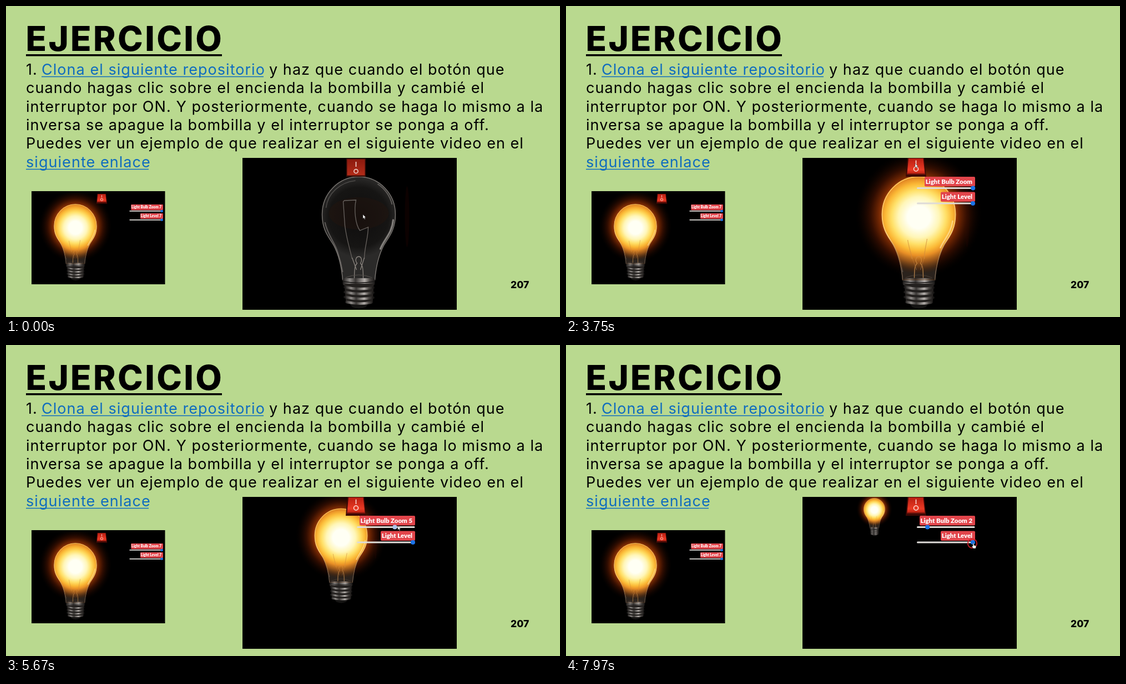
Animation of 998 by 561 pixels, one loop 8 s. Source, as an HTML page:

```html
<!DOCTYPE html>
<html lang="es">
<head>
<meta charset="utf-8">
<title>Ejercicio</title>
<style>
html, body { margin: 0; width: 100%; height: 100%; overflow: hidden; background: #b9d98f; }
svg { display: block; width: 998px; height: 561px; }
.title { font: 800 61.5px Inter, sans-serif; letter-spacing: 3.4px; }
.body { font: 400 27px Inter, sans-serif; letter-spacing: 1.05px; }
.link { fill: #0f6cbf; }
.page { font: 800 17.5px Inter, sans-serif; }
.tag { font: 900 11.4px Lato, sans-serif; fill: #fff; text-anchor: end; }
</style>
</head>
<body>
<svg viewBox="0 0 998 561">
  <defs>
    <clipPath id="bigClip"><rect x="426" y="274" width="386" height="274"/></clipPath>
    <clipPath id="smallClip"><rect x="46" y="334" width="240.5" height="168"/></clipPath>
    <radialGradient id="glow" gradientUnits="userSpaceOnUse" cx="0" cy="0" r="114">
      <stop offset=".52" stop-color="#c8560a"/>
      <stop offset=".62" stop-color="#7a2a03"/>
      <stop offset=".76" stop-color="#380f01" stop-opacity=".9"/>
      <stop offset="1" stop-color="#0a0200" stop-opacity="0"/>
    </radialGradient>
    <radialGradient id="light" gradientUnits="userSpaceOnUse" cx="0" cy="5" r="102">
      <stop offset=".2" stop-color="#fffff4"/>
      <stop offset=".36" stop-color="#fff6b8"/>
      <stop offset=".48" stop-color="#ffe068"/>
      <stop offset=".59" stop-color="#fbb936"/>
      <stop offset=".68" stop-color="#e88f26"/>
      <stop offset=".8" stop-color="#a85c18" stop-opacity=".85"/>
      <stop offset=".92" stop-color="#542808" stop-opacity=".6"/>
      <stop offset="1" stop-color="#2a1200" stop-opacity=".3"/>
    </radialGradient>
    <linearGradient id="rim" gradientUnits="userSpaceOnUse" x1="0" y1="-68" x2="0" y2="100">
      <stop offset="0" stop-color="#ffbe50"/>
      <stop offset=".65" stop-color="#ffcf78"/>
      <stop offset="1" stop-color="#8a4a12" stop-opacity=".2"/>
    </linearGradient>
    <radialGradient id="glass" gradientUnits="userSpaceOnUse" cx="0" cy="5" r="72">
      <stop offset="0" stop-color="#0e0d0d"/>
      <stop offset=".75" stop-color="#161514"/>
      <stop offset="1" stop-color="#2b2a29"/>
    </radialGradient>
    <linearGradient id="metal">
      <stop offset="0" stop-color="#1c1a19"/>
      <stop offset=".22" stop-color="#8f8b88"/>
      <stop offset=".4" stop-color="#3a3735"/>
      <stop offset=".68" stop-color="#b4afab"/>
      <stop offset=".84" stop-color="#4c4845"/>
      <stop offset="1" stop-color="#181615"/>
    </linearGradient>
    <linearGradient id="keyOff" x2="0" y2="1">
      <stop offset="0" stop-color="#8c1a0e"/><stop offset="1" stop-color="#b22c19"/>
    </linearGradient>
    <linearGradient id="keyOn" x2="0" y2="1">
      <stop offset="0" stop-color="#b81e12"/><stop offset=".75" stop-color="#ea3a24"/><stop offset="1" stop-color="#c02414"/>
    </linearGradient>
    <path id="shape" d="M-29 118C-31 95-36 73-45 56C-52 43-66 30-66 0A66 68 0 0 1 66 0C66 30 52 43 45 56C36 73 31 95 29 118Z"/>

    <g id="dark" fill="none">
      <use href="#shape" fill="url(#glass)" stroke="#77736f" stroke-width="1.5"/>
      <ellipse cx="0" cy="-2" rx="54" ry="29" fill="#24160f" opacity=".45"/>
      <path d="M-59-12C-56-38-34-58-6-61" stroke="#4c4a48" stroke-width="1.5"/>
      <path d="M62 10C60 34 46 44 39 62" stroke="#b5b1ad" stroke-width="3.2" opacity=".65" stroke-linecap="round"/>
      <path d="M-61 14C-56 38-44 48-38 68C-34 80-31 92-29 104" stroke="#85817d" stroke-width="2" opacity=".6"/>
      <path d="M34-55C46-47 56-34 60-18" stroke="#85817d" stroke-width="2" opacity=".6"/>
      <path d="M-12 80C-16 62-22 45-25 20L-28-23L-26-25L-5-26C-9-8-6 18 2 29L17 23C17 42 10 60 10 80" stroke="#67625e" stroke-width="1.3"/>
      <path d="M-8 116C-8 98-7 92-3 88C-8 82-4 76 0 76S7 82 3 88C7 92 8 98 8 116M-12 78L-4 100M10 78L3 100" stroke="#8a847e" stroke-width="1.3"/>
      <path d="M-24 114Q0 104 24 114" stroke="#55504c"/>
    </g>
    <g id="base">
      <path d="M-19 157H20L13 167Q0 173-12 167Z" fill="#151413"/>
      <rect x="-29" y="115" width="58" height="13" rx="4" fill="url(#metal)"/>
      <path d="M-26 125H27L25 160Q0 166-23 160Z" fill="#24211f"/>
      <g fill="none" stroke="url(#metal)" stroke-width="4.5" stroke-linecap="round">
        <path d="M-25 131Q0 137 26 132M-25 140Q0 146 26 141M-25 149Q0 155 26 150M-22 158Q0 163 22 159"/>
      </g>
      <path d="M-28 121Q0 126 28 121" fill="none" stroke="#1b1918" stroke-width="1.5"/>
    </g>
    <g id="lit">
      <use href="#shape" fill="url(#light)" stroke="url(#rim)" stroke-width="1.8"/>
      <path d="M-12 80C-15 66-18 58-20 46M10 80C10 66 13 57 15 44M-8 114C-8 98-7 92-3 88C-8 82-4 76 0 76S7 82 3 88C7 92 8 98 8 114" fill="none" stroke="#d08a3c" stroke-width="1.3" opacity=".65"/>
      <path d="M61 12C58 34 46 44 39 60" fill="none" stroke="#ffeab0" stroke-width="2.6" opacity=".6" stroke-linecap="round"/>
    </g>

    <g id="switchOff">
      <rect x="613" y="275" width="35" height="33" rx="1" fill="#3a0d08"/>
      <rect x="614.5" y="276.5" width="32" height="29" fill="url(#keyOff)"/>
      <path d="M630.5 281V290" stroke="#f3dcd6" stroke-width="1.6"/>
      <circle cx="630.5" cy="298" r="3.6" fill="none" stroke="#f3dcd6" stroke-width="1.5"/>
    </g>
    <g id="switchOn">
      <path d="M615 274H645L649 308H612Z" fill="#3d0905"/>
      <path d="M617 275H643.5L646.5 302H614.5Z" fill="url(#keyOn)"/>
      <path d="M614 303H647" stroke="#7c150c" stroke-width="2"/>
      <path d="M630.5 278.500V287" stroke="#ffe6e0" stroke-width="1.5"/>
      <circle cx="630.5" cy="294" r="4" fill="none" stroke="#ffe6e0" stroke-width="1.5"/>
    </g>
  </defs>

  <rect width="998" height="561" fill="#b9d98f"/>
  <text class="title" x="35.5" y="81">EJERCICIO</text>
  <rect x="36" y="87" width="353" height="3.5"/>
  <g class="body">
    <text x="36" y="124">1.</text>
    <text class="link" x="64" y="124">Clona el siguiente repositorio</text>
    <text x="474" y="124">y haz que cuando el botón que</text>
    <text x="36" y="157.300">cuando hagas clic sobre el encienda la bombilla y cambié el</text>
    <text x="36" y="190.600">interruptor por ON. Y posteriormente, cuando se haga lo mismo a la</text>
    <text x="36" y="223.900">inversa se apague la bombilla y el interruptor se ponga a off.</text>
    <text x="36" y="257.200">Puedes ver un ejemplo de que realizar en el siguiente video en el</text>
    <text class="link" x="36" y="290.500">siguiente enlace</text>
  </g>
  <path d="M64 127.500H464M36 294.500H257" stroke="#0f6cbf" stroke-width="1.6"/>
  <text class="page" x="909" y="508.500">207</text>

  <g clip-path="url(#smallClip)">
    <rect x="46" y="334" width="241" height="168"/>
    <g transform="translate(125 397) scale(.577)">
      <circle r="114" fill="url(#glow)"/>
      <use href="#dark"/><use href="#base"/><use href="#lit"/>
    </g>
    <use href="#switchOn" transform="translate(-161.700 193.500) scale(.53)"/>
    <g id="smallPanel" transform="translate(-142.300 180.400) scale(.577)"></g>
  </g>

  <g clip-path="url(#bigClip)">
    <rect x="425" y="273" width="388" height="276"/>
    <g id="bulb">
      <ellipse cx="87" cy="4" rx="4" ry="55" fill="#1c0302" opacity=".45"/>
      <circle id="halo" r="114" fill="url(#glow)"/>
      <use href="#dark"/><use href="#base"/>
      <use id="lamp" href="#lit"/>
    </g>
    <use id="key" href="#switchOff"/>
    <g id="panel"></g>
    <circle id="ring" r="8.2" fill="none" stroke="#d3202a" stroke-width="1.8"/>
    <g id="cursor" fill="#fff" stroke="#222" stroke-width=".5">
      <path id="arrow" d="M0 0V7.500L1.700 6L3 8.800L4.200 8.200L3 5.500H5.200Z"/>
      <path id="hand" d="M0 0Q1-1 1.800 0V3.200L5 4Q6 4.500 5.700 6L5 9H.8L-1.800 5.500Q-1.500 4 0 5Z"/>
    </g>
  </g>
</svg>
<script>
const LOOP = 8000;
const $ = id => document.getElementById(id);
const BLUE = '#1a73e8';

function row(y, text, width) {
  return `<rect x="${737 - width}" y="${y}" width="${width}" height="17.500" rx="2" fill="#e2454b"/>
    <text class="tag" x="732" y="${y + 12.8}">${text}</text>
    <path d="M633.500 ${y + 20.5}H735" stroke="#dedbd8" stroke-width="3" stroke-linecap="round"/>
    <circle cx="733" cy="${y + 20.5}" r="4" fill="${BLUE}"/>`;
}
$('smallPanel').innerHTML = row(308, 'Light Bulb Zoom 7', 100) + row(335.5, 'Light Level 7', 71);
$('panel').innerHTML = row(308, 'Light Bulb Zoom', 91) + row(335.5, 'Light Level', 62);
const [tagBox, tagText, , thumb] = $('panel').children;

// Cursor path: time, x, y
const path = [
  [0, 643, 376], [130, 643, 376], [500, 637, 330], [930, 629, 284], [3880, 629, 284],
  [4250, 690, 312], [4650, 735, 327], [4950, 735, 327], [5100, 731, 327], [5330, 721, 326],
  [5600, 709, 326], [6000, 691, 326], [6380, 659, 326], [6650, 646, 326],
  [6900, 646, 326], [7350, 733, 358], [LOOP, 733, 358]
];

const clamp = v => Math.max(0, Math.min(1, v));
const between = (t, a, b) => t >= a && t < b;
const show = (el, on) => el.setAttribute('visibility', on ? 'inherit' : 'hidden');

function cursorAt(t) {
  const i = path.findIndex(k => k[0] > t);
  const [t0, x0, y0] = path[i - 1], [t1, x1, y1] = path[i];
  const p = (t - t0) / (t1 - t0);
  return [x0 + (x1 - x0) * p, y0 + (y1 - y0) * p];
}

// The slider snaps to whole steps under the cursor.
function zoomAt(t, x) {
  if (t < 4950) return 7;
  if (t > 6900) return 2;
  return Math.max(2, Math.min(7, Math.round((x - 618.6) / 16.4)));
}

function draw(t) {
  const [x, y] = cursorAt(t);
  const zoom = zoomAt(t, x);
  const on = t >= 3230;
  const drag = between(t, 4950, 6850);
  const glow = clamp((t - 3130) / 570);

  $('bulb').setAttribute('transform',
    `translate(${523.5 + 16 * zoom} ${264 + 16 * zoom}) scale(${zoom / 7})`);
  $('halo').setAttribute('opacity', glow);
  $('lamp').setAttribute('opacity', glow);
  $('key').setAttribute('href', on ? '#switchOn' : '#switchOff');

  show($('panel'), on);
  const moved = t >= 5200;
  tagText.textContent = moved ? `Light Bulb Zoom ${zoom}` : 'Light Bulb Zoom';
  tagBox.setAttribute('x', moved ? 637 : 646);
  tagBox.setAttribute('width', moved ? 100 : 91);
  thumb.setAttribute('cx', 618.4 + 16.4 * zoom);
  thumb.setAttribute('fill', drag ? '#a9c4ea' : BLUE);

  const hand = between(t, 4600, 4950) || t >= 7300;
  $('cursor').setAttribute('transform', `translate(${x} ${y})`);
  show($('hand'), hand);
  show($('arrow'), !hand);
  $('ring').setAttribute('transform', `translate(${x - 1} ${y})`);
  show($('ring'), between(t, 4880, 5020) || t >= 7880);
}

const start = performance.now();
function tick() {
  draw((performance.now() - start) % LOOP);
  requestAnimationFrame(tick);
}
tick();
</script>
</body>
</html>
```
